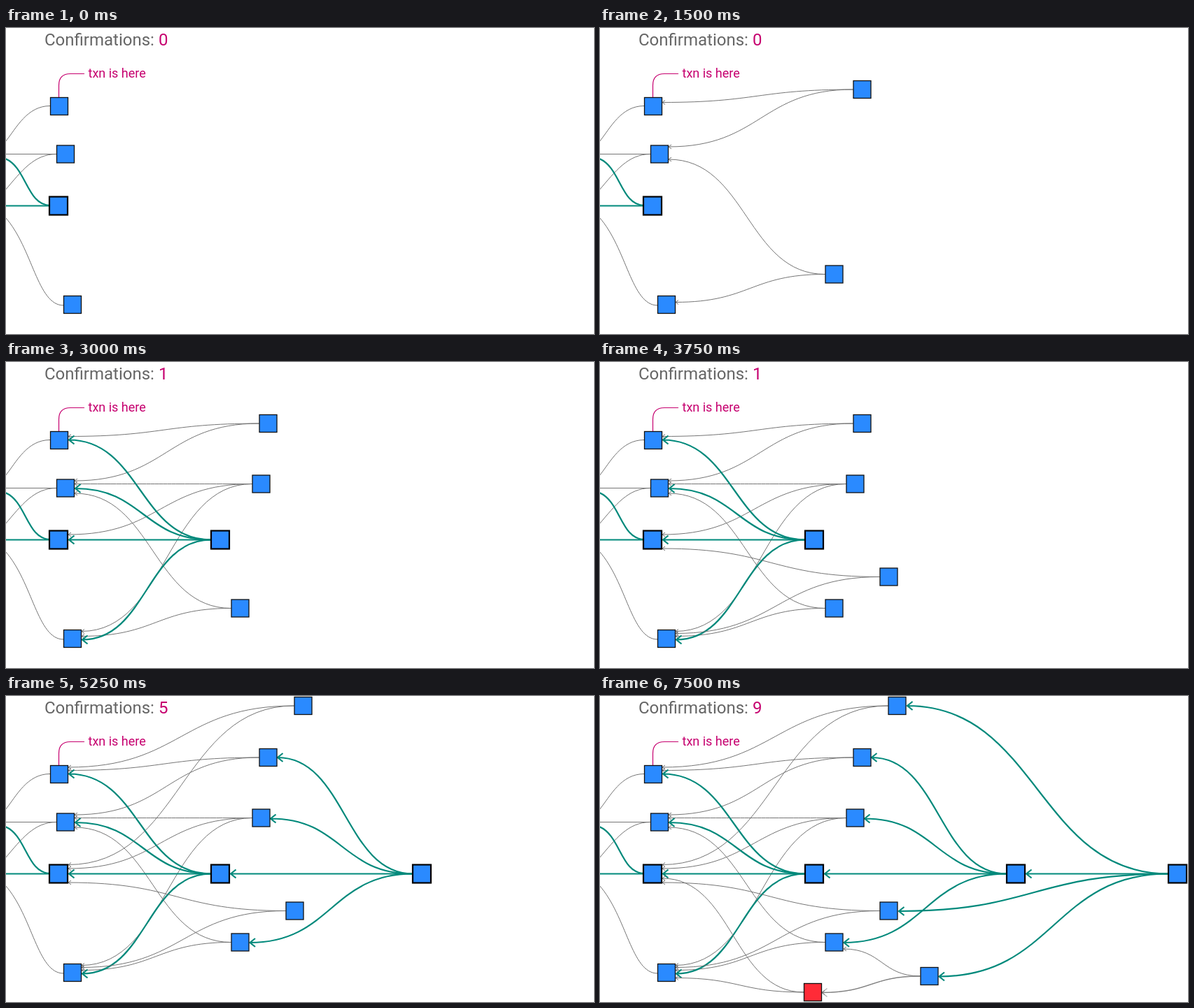
These frames come from a looping animation (840 px wide and 438 px high, 8250 ms). An HTML page:

```html
<!DOCTYPE html>
<html lang="en">
<head>
<meta charset="utf-8">
<title>Confirmations</title>
<style>
  html, body { margin: 0; width: 100%; height: 100%; overflow: hidden; background: #fff; }
  svg { display: block; width: 840px; height: 438px; }
  path { fill: none; }
  .link { stroke: #757575; stroke-width: 1; }
  .main { stroke: #00897b; stroke-width: 2.2; }
  .faded { stroke: #b8b8b8; stroke-width: 1.6; }
  .note { stroke: #c6006f; stroke-width: 1.2; }
  rect { fill: #2a8aff; stroke: #111; stroke-width: 1.3; }
  rect.anchor { stroke: #000; stroke-width: 2.2; }
  rect.orphan { fill: #ff2b37; }
  text { font-family: Roboto, Arial, sans-serif; font-size: 24px; fill: #666; white-space: pre; }
  .pink { fill: #c6006f; }
  .small { font-size: 18px; }
</style>
</head>
<body>
<svg viewBox="0 0 840 438">
  <g id="links"></g>
  <g id="nodes"></g>
  <path class="note" d="M75.5 99V82Q75.5 65.5 92 65.5H112"/>
  <text class="small pink" x="117.5" y="71">txn is here</text>
  <text x="55" y="25">Confirmations: <tspan id="count" class="pink">0</tspan></text>
</svg>
<script>
const STEP = 750, STEPS = 11;
const $ = id => document.getElementById(id);
const timed = [];

function add(parent, tag, attrs, step) {
  const el = document.createElementNS('http://www.w3.org/2000/svg', tag);
  for (const k in attrs) el.setAttribute(k, attrs[k]);
  $(parent).append(el);
  timed.push({ el, step });
  return el;
}

function node(x, y, step, anchor) {
  const r = anchor ? 13 : 12.5;
  return add('nodes', 'rect',
    { x: x - r, y: y - r, width: 2 * r, height: 2 * r, class: anchor ? 'anchor' : '' }, step);
}

// S-curve that leaves and arrives horizontally, ending in an open arrowhead
function link(x0, y0, x1, y1, step, cls = 'link') {
  const mid = (x0 + x1) / 2;
  const [w, h] = cls === 'link' ? [4, 3] : [7.5, 6];
  add('links', 'path', {
    class: cls,
    d: `M${x0} ${y0}C${mid} ${y0} ${mid} ${y1} ${x1} ${y1}` +
       `M${x1 + w} ${y1 - h}L${x1} ${y1}L${x1 + w} ${y1 + h}`
  }, step);
}

// Each block: step, centre, points its links reach
const blocks = [
  { step: 1, at: [334.5, 352.5], to: [[98, 188], [108, 392.5]] },
  { step: 2, at: [374.5, 88], to: [[89, 106.5], [98, 170]] },
  { step: 3, at: [364.5, 174.5], to: [[98, 174.5], [89, 247], [108, 385.5]] },
  { step: 4, at: [306, 254.5], to: [[90, 111.5], [99, 181], [90, 254.5], [109, 397.5]], anchor: true },
  { step: 5, at: [412.5, 307.5], to: [[89, 267], [108, 388.5]] },
  { step: 6, at: [424.5, 14], to: [[89, 102], [89, 241.5]] },
  { step: 7, at: [594, 254.5], to: [[388, 88], [378, 175.5], [321, 254.5], [348.5, 353]], anchor: true },
  { step: 8, at: [304, 424], to: [[89, 261], [108, 403.5]] },
  { step: 9, at: [470.5, 401], to: [[348, 362], [317, 424.5]] },
  { step: 10, at: [825, 254.5], to: [[439, 14], [609, 254.5], [427, 308], [484.5, 401.5]], anchor: true }
];

// Links that come in from the left edge
for (const d of ['M63 111.5C30 111.5 15 143 -1 163', 'M0 180.5H72',
                 'M72 180.5C40 180.5 22 205 -1 232', 'M82 397C45 397 38 315 -1 271'])
  add('links', 'path', { class: 'link', d }, 0);
for (const d of ['M63 254C30 254 29 199 -1 187', 'M0 254.5H63'])
  add('links', 'path', { class: 'main', d }, 0);

node(76, 112, 0);
node(85, 180.5, 0);
node(75, 254.5, 0, true);
node(95, 396, 0);

link(457, 401, 317, 424.5, 10, 'faded');
let orphan;
for (const { step, at: [x, y], to, anchor } of blocks) {
  for (const [x1, y1] of to) link(x - 13, y, x1, y1, step, anchor ? 'main' : 'link');
  const el = node(x, y, step, anchor);
  if (step === 8) orphan = el;
}

function show(step) {
  for (const p of timed) p.el.style.display = p.step <= step ? '' : 'none';
  orphan.classList.toggle('orphan', step >= 10);
  $('count').textContent = step >= 10 ? 9 : step >= 7 ? 5 : step >= 4 ? 1 : 0;
}

const start = performance.now();
let last = -1;
function tick() {
  const step = Math.floor((performance.now() - start) / STEP) % STEPS;
  if (step !== last) show(last = step);
  requestAnimationFrame(tick);
}
tick();
</script>
</body>
</html>
```
